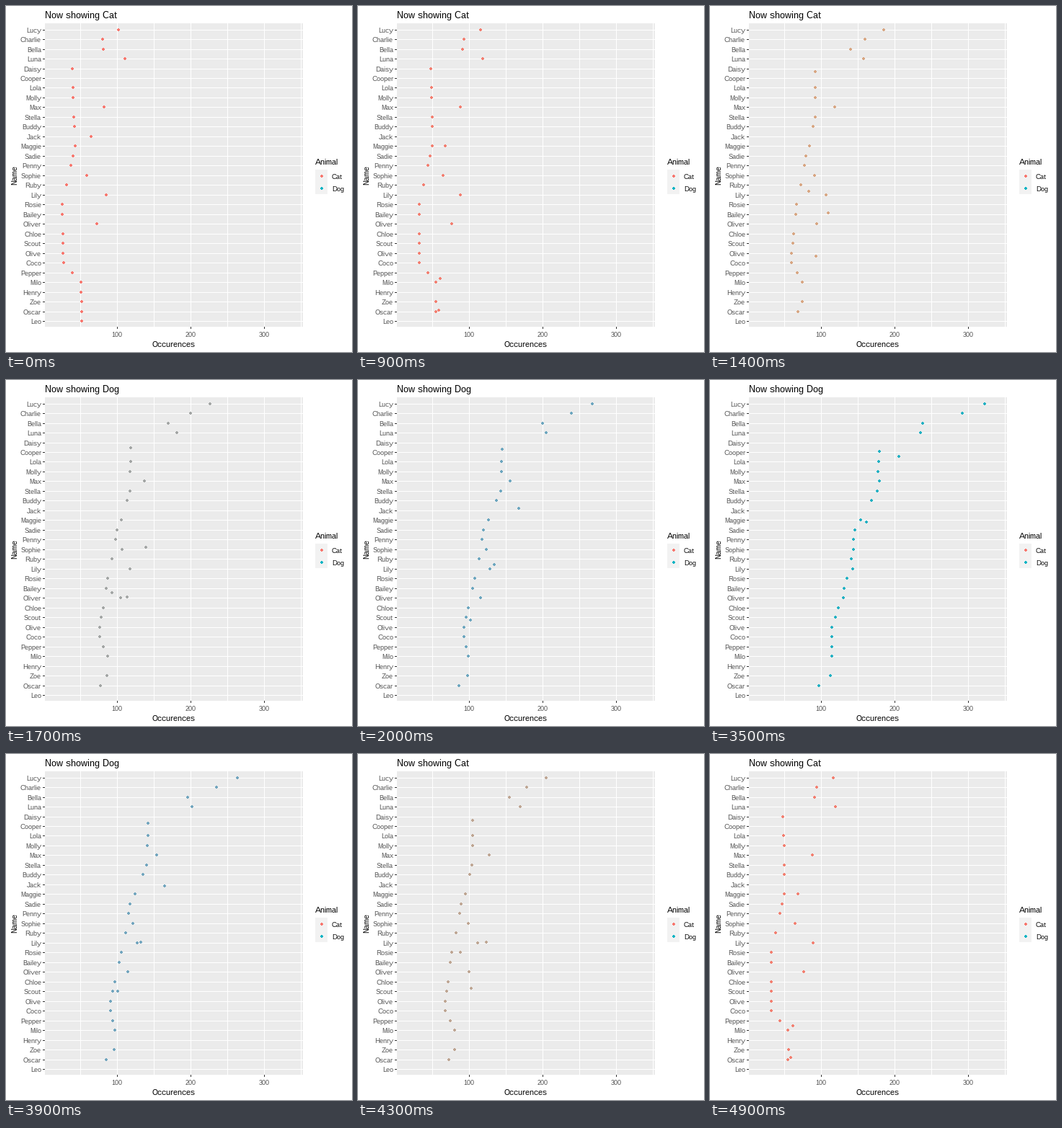
Write a matplotlib script that moves like this. It is 480 px wide and 480 px high and loops after 5 s.

```python
import numpy as np
import matplotlib.pyplot as plt
from matplotlib.animation import FuncAnimation
from matplotlib.collections import PolyCollection
from matplotlib.colors import LinearSegmentedColormap
from matplotlib.patches import Rectangle

SIZE, DPI = 480, 72
FRAMES, INTERVAL = 50, 100
CAT, DOG = "#F8766D", "#0FB4C4"
BLEND = LinearSegmentedColormap.from_list("blend", [CAT, "#DEA67E", "#78A4BE", DOG])
LEFT, RIGHT, TOP, BOTTOM = 54, 412, 24, 445
SMALL, MEDIUM, LARGE = 9, 11, 13

NAMES = ("Lucy Charlie Bella Luna Daisy Cooper Lola Molly Max Stella Buddy Jack "
         "Maggie Sadie Penny Sophie Ruby Lily Rosie Bailey Oliver Chloe Scout "
         "Olive Coco Pepper Milo Henry Zoe Oscar Leo").split()
# Dots that end in another row than they start from
MOVES = {"Daisy": "Cooper", "Jack": "Henry", "Henry": "Daisy", "Leo": "Jack"}

# Key points (row, count) of both curves, and the names cats favour
DOG_CURVE = [(0, 337), (1, 306), (2, 249), (3, 244), (5, 189), (9, 185),
             (13, 153), (17, 147), (23, 121), (28, 117), (29, 100)]
CAT_CURVE = [(4, 39), (12, 43), (18, 25), (24, 27), (26, 51), (30, 52)]
CAT_FAVOURITES = dict(Lucy=102, Charlie=80, Bella=81, Luna=111, Max=82,
                      Jack=65, Sophie=59, Lily=85, Oliver=73)


def dog_count(row):
    return np.interp(row, *zip(*DOG_CURVE))


def cat_count(row):
    return CAT_FAVOURITES.get(NAMES[row], np.interp(row, *zip(*CAT_CURVE)))


def x_of(count):
    return 154 + 1.02 * (count - 100)


def y_of(row):
    return 32.6 + 13.48 * row


def dot_outline():
    """A disc four pixels wide: one corner step, turned four times."""
    corner = np.array([1 - 2j, 1 - 1j, 2 - 1j])
    outline = np.concatenate([corner * 1j ** turn for turn in range(4)])
    return np.column_stack([outline.real, outline.imag])


def dots_at(centres):
    return [dot_outline() + np.floor(np.asarray(c) + 0.5) for c in centres]


def endpoints():
    start, end = [], []
    for row, name in enumerate(NAMES):
        if name == "Cooper":  # no cat has this name
            continue
        goal = NAMES.index(MOVES.get(name, name))
        start.append((x_of(cat_count(row)), y_of(row)))
        end.append((x_of(dog_count(goal)), y_of(goal)))
    return np.array(start), np.array(end)


plt.rcParams.update({"font.family": "Liberation Sans", "text.hinting": "default",
                     "text.hinting_factor": 1})
fig = plt.figure(figsize=(SIZE / DPI, SIZE / DPI), dpi=DPI, facecolor="white")
ax = fig.add_axes([0, 0, 1, 1])
ax.set_xlim(0, SIZE)
ax.set_ylim(SIZE, 0)
ax.axis("off")


def box(x, y, w, h, color):
    ax.add_patch(Rectangle((x, y), w, h, fc=color, lw=0, antialiased=False))


def label(x, y, text, size, color="black", ha="left", **kw):
    return ax.text(x, y, text, fontsize=size, color=color, ha=ha,
                   va="baseline", **kw)


def add_dots(centres, colors, **kw):
    return ax.add_collection(PolyCollection(
        dots_at(centres), facecolors=colors, linewidths=0, antialiaseds=False, **kw))


# Panel, grid and axes
box(LEFT, TOP, RIGHT - LEFT, BOTTOM - TOP, "#EBEBEB")
for count in range(50, 351, 50):
    x = round(x_of(count))
    box(x, TOP, 1, BOTTOM - TOP, "white")
    if count % 100 == 0:
        box(x, BOTTOM, 1, 3, "#333333")
        label(x, 459, str(count), SMALL, "#4D4D4D", "center")
for row, name in enumerate(NAMES):
    y = round(y_of(row))
    box(LEFT, y, RIGHT - LEFT, 1, "white")
    box(LEFT - 3, y, 3, 1, "#333333")
    label(49, y + 4, name, SMALL, "#4D4D4D", "right")

title = label(LEFT, 17, "", LARGE)
label(233, 473, "Occurences", MEDIUM, ha="center")
label(15, 235, "Name", MEDIUM, ha="center", rotation=90, rotation_mode="anchor")

# Legend
label(429, 220, "Animal", MEDIUM)
box(429, 227, 17, 34, "#F2F2F2")
for y, name, color in ((236, "Cat", CAT), (253, "Dog", DOG)):
    add_dots([(438, y)], color)
    label(452, y + 4, name, SMALL)

START, END = endpoints()
points = add_dots(START, CAT, zorder=3)


def progress(frame):
    """0 while cats are shown, 1 for dogs, linear in between."""
    return float(np.interp(frame, [0, 8, 25, 34, 50], [0, 0, 1, 1, 0]))


def update(frame):
    p = progress(frame)
    points.set_verts(dots_at(START + (END - START) * p))
    points.set_facecolor(BLEND(p))
    title.set_text("Now showing " + ("Dog" if p > 0.5 else "Cat"))
    return points, title


anim = FuncAnimation(fig, update, frames=FRAMES, interval=INTERVAL,
                     repeat=True, repeat_delay=0, blit=False)
plt.show()
```
